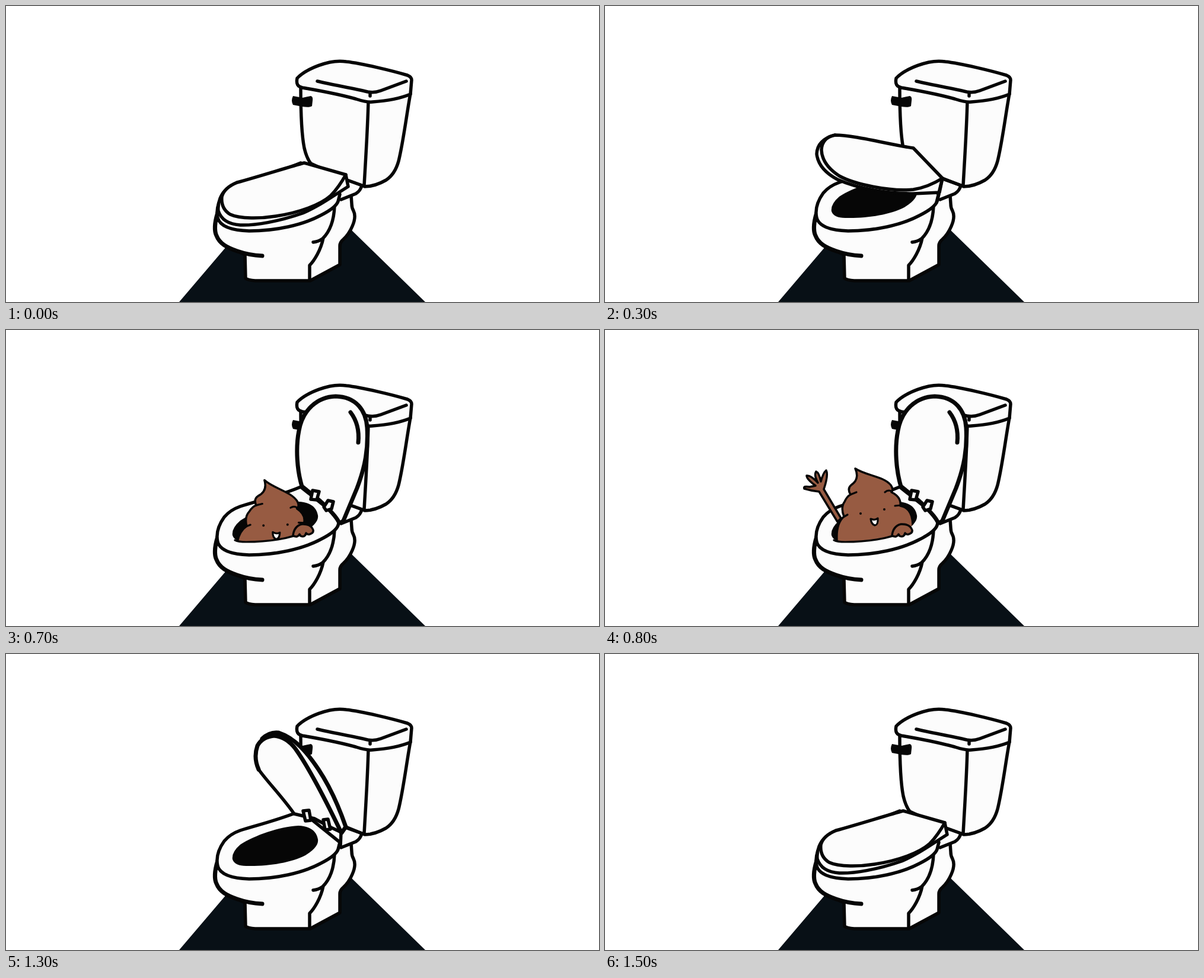
An HTML page that plays this animation: 1000x500 px, repeating every 1600 ms.

```html
<!DOCTYPE html>
<html lang="en">
<head>
<meta charset="utf-8">
<title>Surprise in the bowl</title>
<style>
  html, body { margin: 0; height: 100%; overflow: hidden; background: #fff; }
  svg { display: block; width: 100%; height: 100%; }
  .ink { fill: #fcfcfc; stroke: #060606; stroke-width: 5.5; stroke-linecap: round; stroke-linejoin: round; }
  .line { fill: none; }
  .thick { stroke-width: 7; }
  .dark { fill: #060606; stroke: none; }
  .brown { fill: #975b42; stroke-width: 3.5; }
  .thin { stroke-width: 3.2; }
  [data-part] { display: none; }
</style>
</head>
<body>
<svg viewBox="0 0 1000 500">
  <defs>
    <clipPath id="inBowl">
      <path d="M370 200H560V313H526Q528 326 505 340C480 353 440 359 405 358Q386 358 382 347Z"/>
    </clipPath>
  </defs>
  <path fill="#081016" d="M292 500 400 373H577L707 500Z"/>

  <g class="ink">
    <!-- tank -->
    <path d="M497 137C497 180 498 215 503 240Q507 257 514 266L575 294 605 305Q622 305 641 294Q656 284 662 262C670 230 676 180 682 148"/>
    <path class="line" d="M611 160C610 205 607 250 604 303"/>
    <path class="dark" d="M484 152 500 155 514 152Q518 153 517 160L516 169Q512 172 500 170L484 167Q480 160 484 152Z"/>
    <path d="M491 122C489 132 492 136 500 138C535 144 565 150 590 157Q608 163 618 162C645 160 665 156 682 149L684 125Q684 120 677 117C650 109 600 97 574 94Q560 92 546 95C520 101 500 112 491 122Z"/>
    <path class="line" d="M525 127C550 133 585 139 610 145Q622 147 632 143L675 127M614 147V152"/>

    <!-- base and bowl -->
    <path d="M357 349C352 365 351 380 355 388C360 401 372 408 390 414L403 420 404 460Q408 463 420 464H513L563 437V405Q563 399 569 394Q578 386 584 372Q591 356 586 346Q583 341 583 334L582 320"/>
    <path class="line" d="M554 338C553 365 545 382 534 393Q527 398 518 399M535 392C531 412 520 430 512 438V463"/>
    <path class="line thick" d="M357 349C352 365 351 380 355 388C360 401 372 408 390 414Q410 421 432 422"/>
    <path d="M565 290 575 294 600 303Q598 312 590 317L565 327"/>

    <!-- seat -->
    <path d="M497 265 487 269C450 283 420 290 395 298Q378 304 368 316C358 330 354 345 357 358C361 372 380 379 410 380C455 380 500 370 530 354Q556 341 560 330L563 318Z"/>
    <path class="dark" d="M493 290C460 292 420 306 395 322Q380 335 382 347Q386 358 405 358C440 359 480 353 505 340Q528 326 526 313Q522 291 493 290Z"/>

    <!-- lid, from closed to upright -->
    <g data-part="shut">
      <path d="M390 298Q368 307 361 325Q357 335 358 346Q365 368 395 370C420 371 460 364 500 350C530 337 545 325 577 305L573 285Z"/>
      <path d="M503 265C480 271 430 287 390 298Q368 307 364 322Q362 342 378 352C395 360 430 359 455 355C495 349 530 336 548 320Q562 305 573 285Z"/>
    </g>
    <g data-part="ajar">
      <path d="M390 273Q362 278 352 296Q345 310 350 322Q360 342 390 347C430 352 500 340 565 316L570 289Z"/>
      <path d="M508 254C480 256 425 264 390 273Q362 280 358 301Q357 320 378 330C405 341 460 337 500 328Q545 317 570 289Z"/>
    </g>
    <g data-part="half">
      <path d="M388 218Q358 226 357 250Q360 276 392 293C430 310 480 317 520 317L564 315 569 291Z"/>
      <path d="M365 243Q366 222 388 218C420 218 480 234 520 240L569 291Q545 306 520 310C480 314 420 301 395 287Q366 268 365 243Z"/>
      <path class="line" d="M569 291 559 332M569 291 600 303"/>
    </g>
    <g data-part="steep">
      <path class="thick" d="M432 143Q445 131 460 133C487 142 507 165 527 195C547 225 562 260 573 292L566 302Z"/>
      <path d="M486 270C465 240 440 215 426 195Q417 175 424 155Q432 140 452 138Q473 140 488 160C513 195 543 255 565 301L548 293 520 278Z"/>
      <path class="line thick" d="M426 195Q417 175 424 155Q432 140 452 138Q473 140 488 160C513 195 543 255 565 301"/>
      <path d="M501 265 511 264 514 281 505 282ZM535 280 543 279 547 296 538 297Z"/>
      <path class="line" d="M573 292 600 303M565 301 564 325"/>
    </g>
    <g data-part="up">
      <path class="thick" d="M499 264C491 238 488 200 494 170C500 135 525 113 556 112C590 113 607 135 609 165C611 200 606 230 592 267L569 322Q565 327 561 324Q555 312 530 289Z"/>
      <path class="line thick" d="M581 139Q597 160 594 190"/>
      <path d="M517 271 528 273 524 287 514 286ZM543 288 552 290 549 302 540 305 536 299Z"/>
    </g>

    <!-- visitor -->
    <path data-part="arm" class="brown" d="M392 324 361 273Q349 272 336 268Q334 263 345 265L355 263Q340 252 340 246Q347 245 359 258Q352 245 356 239Q361 241 364 256Q368 241 373 237Q377 245 369 269L398 318Z"/>
    <g data-part="body" clip-path="url(#inBowl)">
      <g id="body">
        <path class="brown" d="M391 395V355C390 335 395 322 403 315Q397 300 404 290Q408 281 414 278Q408 268 415 262Q430 252 422 234C440 246 470 247 482 262Q487 269 483 274Q500 282 498 297Q515 300 518 320Q521 335 515 395Z"/>
        <path class="line thin" d="M414 278 424 274M472 274Q478 269 484 273M489 297 499 296M402 316 409 312"/>
        <circle class="dark" cx="431" cy="310" r="2"/>
        <circle class="dark" cx="471" cy="303" r="2"/>
        <path class="thin" d="M448 319Q455 322 460 318Q461 329 455 330Q449 328 448 319Z"/>
      </g>
    </g>
    <path data-part="body" class="line thin" d="M386 355Q392 358 405 358C440 358 480 353 505 340"/>
    <path data-part="hand" class="brown" d="M484 347Q486 331 499 328Q514 327 518 338Q519 343 512 345Q508 346 506 343Q504 351 497 348L495 345Q491 352 484 347Z"/>
  </g>
</svg>
<script>
  const LOOP = 1600;
  // start time, visible parts, sinking depth of the visitor (0 = fully out)
  const poses = [
    [0, "shut"],
    [100, "ajar"],
    [300, "half"],
    [400, "steep"],
    [500, "up"],
    [600, "up body", 1.9],
    [700, "up body hand", 1],
    [800, "up arm body hand", 0],
    [1100, "up body hand", 1],
    [1200, "up"],
    [1300, "steep"],
    [1400, "half"],
    [1500, "shut"]
  ];
  const parts = document.querySelectorAll("[data-part]");
  const body = document.getElementById("body");
  const begin = performance.now();

  function draw() {
    const time = (performance.now() - begin) % LOOP;
    const [, names, depth = 0] = poses.findLast(([start]) => start <= time);
    const shown = names.split(" ");
    for (const part of parts) {
      part.style.display = shown.includes(part.dataset.part) ? "inline" : "none";
    }
    body.setAttribute("transform",
      `translate(${3.5 * depth} ${23 * depth}) rotate(${8 * depth} 451 306.5)`);
    requestAnimationFrame(draw);
  }
  draw();
</script>
</body>
</html>
```
